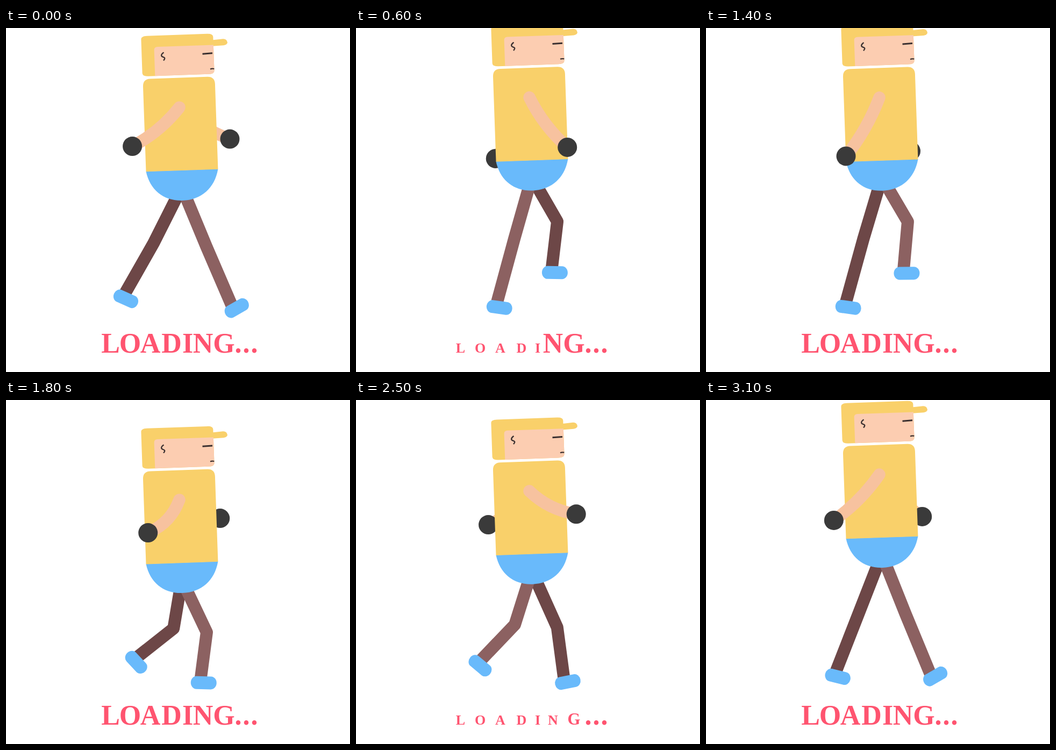
An HTML page that plays this animation: 640x640 px, repeating every 3200 ms.

```html
<!DOCTYPE html>
<html lang="en">
<head>
<meta charset="utf-8">
<title>Loading</title>
<style>
  html, body { margin: 0; width: 100%; height: 100%; overflow: hidden; background: #fff; }
  svg { display: block; width: 100vw; height: 100vh; }
  .limb { fill: none; stroke-linejoin: round; }
  .arm { stroke: #f7c29f; stroke-width: 22.5; stroke-linecap: round; }
  .leg { stroke-width: 23; }
  .ink { fill: none; stroke: #3a3030; }
  text { font-family: "Liberation Serif", "Times New Roman", serif; font-weight: bold; fill: #ff5470; text-anchor: middle; }
</style>
</head>
<body>
<svg viewBox="0 0 640 640">
  <path id="farArm" class="limb arm"/>
  <circle id="farHand" r="18" fill="#3a3a3a"/>
  <path id="farLeg" class="limb leg" stroke="#6d4747"/>
  <rect id="farShoe" x="-24" y="-12" width="48" height="24" rx="10.5" ry="12" fill="#69bafb"/>
  <path id="nearLeg" class="limb leg" stroke="#8c6161"/>
  <rect id="nearShoe" x="-24" y="-12" width="48" height="24" rx="10.5" ry="12" fill="#69bafb"/>
  <g id="body">
    <g transform="translate(254.5 94.8) rotate(-2)">
      <path d="M0 172H134C127 207 101 228.500 66 228.500S6 207 0 172Z" fill="#69bafb"/>
      <path d="M0 172.500V14Q0 0 14 0H120Q134 0 134 14V172.500Z" fill="#f9d06a"/>
    </g>
    <path d="M383 22.300L404 20Q411 20 412 27Q411 31 405 32L383 33.600Z" fill="#f9d06a"/>
    <g transform="translate(251.200 15) rotate(-2)">
      <path d="M0 6Q0 0 11 0H123Q134 0 134 6V69Q134 75 123 75H11Q0 75 0 69Z" fill="#f9d06a"/>
      <path d="M23.500 75V27Q23.500 21 30 21H134V69Q134 75 123 75Z" fill="#fccdb1"/>
    </g>
    <path class="ink" stroke-width="2.300" d="M293.500 45.200C288 49 288 52.500 292 53.800C296.500 55.300 296 57 293 60.300"/>
    <path class="ink" stroke-width="3" d="M365.500 48L384 46.700"/>
    <path class="ink" stroke-width="2.200" d="M380 76.300Q383 75 387.300 75.800"/>
  </g>
  <path id="nearArm" class="limb arm"/>
  <circle id="nearHand" r="18" fill="#3a3a3a"/>
  <g id="word"></g>
</svg>
<script>
const LOOP = 3200, STRIDE = 1583, SWING = 1600;
const $ = id => document.getElementById(id);
const clamp = (v, a, b) => Math.min(b, Math.max(a, v));

// phase, knee x y, shoe x y, shoe angle
const LEG = [
  [0, 373, 407, 429.5, 521, -30],
  [217, 373.5, 432, 368, 526, 1.5],
  [309, 365, 430.5, 356, 526, 3],
  [600, 294.5, 393, 267, 520, 8],
  [725, 285, 395, 245.5, 515, 14],
  [791, 274.5, 400, 223, 504, 24],
  [1008, 311.5, 425, 242, 488, 47],
  [1100, 317, 401, 260, 480, 35],
  [1392, 374.5, 360, 369.7, 455, 1],
  [1516, 371, 397, 426, 513.5, -30]
];
// half-stride phase, vertical offset
const BOB = [[0, 0], [217, 38], [280, 50], [309, 46.5], [326, 38],
  [440, 2], [520, -14], [592, -18.7], [725, -9]];
// phase, hand x y
const NEAR = [[0, 235, 220], [200, 264, 247], [400, 333, 252], [600, 393, 222],
  [780, 416, 207], [940, 404, 216], [1100, 363, 238.5], [1300, 290, 250], [1500, 238, 224]];
const FAR = [[0, 416.5, 206.5], [200, 398.5, 220], [400, 334, 250], [600, 260, 243],
  [800, 235, 222], [1000, 268, 245], [1200, 333, 250], [1500, 402, 217]];

// Smooth periodic curve through the keys
function sample(keys, period, time) {
  const n = keys.length, t = ((time % period) + period) % period;
  const at = i => {
    const turn = Math.floor(i / n), k = keys[i - turn * n];
    return [k[0] + turn * period, ...k.slice(1)];
  };
  let i = n - 1;
  while (keys[i][0] > t) i--;
  const [a, b, c, d] = [at(i - 1), at(i), at(i + 1), at(i + 2)];
  const h = c[0] - b[0], u = (t - b[0]) / h, v = 1 - u;
  return b.slice(1).map((p, j) => {
    j++;
    const m0 = (c[j] - a[j]) / (c[0] - a[0]) * h;
    const m1 = (d[j] - b[j]) / (d[0] - b[0]) * h;
    return p * (1 + 2 * u) * v * v + m0 * u * v * v + c[j] * u * u * (3 - 2 * u) - m1 * u * u * v;
  });
}

function drawLeg(side, phase, hipX, hipY) {
  const [kx, ky, x, y, angle] = sample(LEG, STRIDE, phase);
  const r = angle * Math.PI / 180, c = Math.cos(r), s = Math.sin(r);
  const ax = x - 5.5 * c + 10 * s, ay = y - 5.5 * s - 10 * c;
  $(side + "Leg").setAttribute("d", `M${hipX} ${hipY}L${kx} ${ky}L${ax} ${ay}`);
  $(side + "Shoe").setAttribute("transform", `translate(${x} ${y}) rotate(${angle})`);
}

// The elbow bends more the closer the hand is to the shoulder
function drawArm(side, keys, time, sx, sy) {
  const [x, y] = sample(keys, SWING, time);
  const dx = x - sx, dy = y - sy, len = Math.hypot(dx, dy);
  const bend = Math.max(6, 36 - 0.21 * len) * clamp(dx / 30, -1, 1) / len;
  const cx = sx + dx / 2 - dy * bend, cy = sy + dy / 2 + dx * bend;
  $(side + "Arm").setAttribute("d", `M${sx} ${sy}Q${cx} ${cy} ${x} ${y}`);
  $(side + "Hand").setAttribute("cx", x);
  $(side + "Hand").setAttribute("cy", y);
}

const SIZE = 52, STEP = 46.5;
const centers = [194.5, 231, 268.5, 308, 338, 366.5, 405.5, 432, 447, 462];
const letters = [..."LOADING..."].map((ch, i) => {
  const el = document.createElementNS("http://www.w3.org/2000/svg", "text");
  el.textContent = ch;
  el.setAttribute("x", centers[i]);
  el.setAttribute("y", 603.5);
  return $("word").appendChild(el);
});

function drawWord(t) {
  const ramp = (start, i) => clamp((t - start) / STEP - i, 0, 1);
  letters.forEach((el, i) => {
    const j = letters.length - 1 - i;
    const small = ramp(368, i) - ramp(813, i) + ramp(1875, j) - ramp(2353, j);
    el.setAttribute("font-size", SIZE * (1 - small / 2));
  });
}

function draw(t) {
  const phase = t % STRIDE;
  const [dy] = sample(BOB, STRIDE / 2, phase);
  const dx = -2 * Math.exp(-(((phase - 1080) / 62) ** 2));
  $("body").setAttribute("transform", `translate(${dx} ${dy})`);
  drawLeg("far", phase - STRIDE / 2, 327 + dx, 296 + dy);
  drawLeg("near", phase, 327 + dx, 296 + dy);
  drawArm("far", FAR, t, 322.5 + dx, 147 + dy);
  drawArm("near", NEAR, t, 322.5 + dx, 147.5 + dy);
  drawWord(t);
}

const begin = performance.now();
function tick() {
  draw((performance.now() - begin) % LOOP);
  requestAnimationFrame(tick);
}
tick();
</script>
</body>
</html>
```
